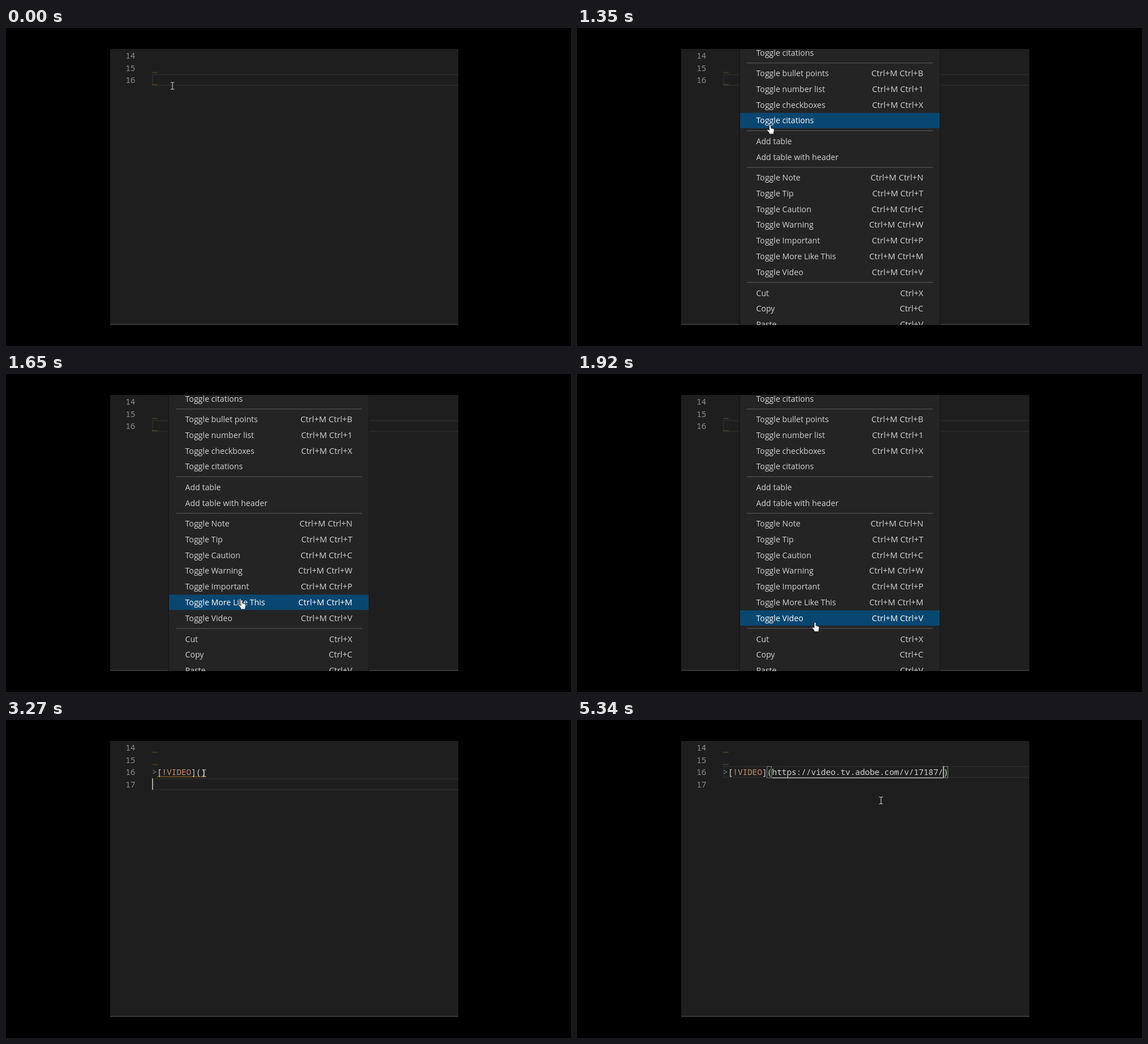
Recreate the animation shown at these times as an HTML page. Size 998 by 561 pixels, loop 5.55 s.

```html
<!DOCTYPE html>
<html lang="en">
<head>
<meta charset="utf-8">
<title>Insert a video link</title>
<style>
  html, body { margin: 0; width: 100%; height: 100%; overflow: hidden; background: #000; }
  svg { display: block; width: 998px; height: 561px; }
  .code { font: 14.4px "Noto Sans Mono", "DejaVu Sans Mono", monospace; fill: #d4d4d4; }
  .gutter { fill: #8e8e8e; text-anchor: end; }
  .quote { fill: #808080; }
  .tag { fill: #ce9178; }
  .menu { font: 14.15px "Open Sans", "Noto Sans", sans-serif; fill: #d2d2d2; }
  .menu .on text { fill: #fff; }
  .menu .bar { fill: none; }
  .menu .on .bar { fill: #094771; }
  .menu .keys { font-size: 14.7px; text-anchor: end; }
  .wave { fill: none; stroke: #a9701f; stroke-width: 1; }
  .faint { opacity: .6; }
  .box { fill: #1b241b; stroke: #858585; }
</style>
</head>
<body>
<svg viewBox="0 0 998 561">
  <clipPath id="pane"><rect x="184" y="37" width="615" height="487"/></clipPath>
  <g clip-path="url(#pane)">
    <rect x="184" y="37" width="615" height="487" fill="#1e1e1e"/>
    <rect id="line" x="259" width="560" height="19" fill="none" stroke="#2a2a2a" stroke-width="2"/>
    <g id="code" class="code"></g>
    <rect x="184" y="522" width="615" height="1.5" fill="#3f3f3f"/>
    <g id="menu" class="menu">
      <rect x="286" y="30" width="356" height="500" fill="#181818"/>
      <rect x="288" y="30" width="352.5" height="500" fill="#242425"/>
    </g>
  </g>
  <g id="beam" fill="none" stroke="#d0d0d0" stroke-width="1.1">
    <path d="M-3.5-6H-1L0-5L1-6H3.5M0-5V5M-3.5 6H-1L0 5L1 6H3.5"/>
  </g>
  <path id="hand" fill="#fff" stroke="#111" stroke-width=".8"
    d="M-1.5 1Q-1.5-.5 0-.5T1.5 1V5.5L5.5 6.5Q7.5 7 7.5 9L6.5 13V16H-1.5V14L-5 9.5Q-5 7.5-3.5 8L-1.5 9.5Z"/>
</svg>
<script>
const LOOP = 5550, STEP = 30;
const CHAR = 8.65, LEFT = 258, PITCH = 21.5;
const OPEN = 390, INSERT = 2160, CLICK = 3480, PASTE = 4140, LINKED = 4320;
const URL_TEXT = "https://video.tv.adobe.com/v/17187/";

const $ = id => document.getElementById(id);
const col = n => LEFT + n * CHAR;
const rowTop = n => 81.5 + (n - 16) * PITCH;

function add(parent, tag, attrs, text = "") {
  const el = document.createElementNS("http://www.w3.org/2000/svg", tag);
  for (const key in attrs) el.setAttribute(key, attrs[key]);
  el.textContent = text;
  return parent.appendChild(el);
}
const show = (el, on) => el.setAttribute("visibility", on ? "visible" : "hidden");
const within = (t, a, b) => t >= a && t < b;

// Editor
const code = $("code");
const write = (n, row, text, cls = "") =>
  add(code, "text", { x: col(n), y: rowTop(row) + 15.5, class: cls }, text);

function wave(from, to, row, cls = "") {
  let d = `M${from} ${rowTop(row) + 19.5}`;
  for (let x = from, up = true; x < to; x += 2, up = !up) d += `l2 ${up ? -2 : 2}`;
  return add(code, "path", { d, class: "wave " + cls });
}
const box = n => add(code, "rect",
  { x: col(n) - .3, y: 82, width: 8, height: 20, class: "box" });

const numbers = [14, 15, 16, 17].map(n =>
  add(code, "text", { x: 228.5, y: rowTop(n) + 15.5, class: "gutter" }, n));
const waves = [14, 15, 16].map(n => wave(LEFT, 267, n, "faint"));
const openBox = box(9), innerBox = box(10), outerBox = box(10 + URL_TEXT.length);
const snippet = [write(0, 16, ">", "quote"), write(1, 16, "["),
  write(2, 16, "!VIDEO", "tag"), write(8, 16, "]"), write(9, 16, "(")];
const innerClose = write(10, 16, ")");
const link = write(10, 16, URL_TEXT);
const outerClose = write(10 + URL_TEXT.length, 16, ")");
const underline = add(code, "rect",
  { x: col(10), y: 101.5, width: URL_TEXT.length * CHAR, height: 1.2, fill: "#d4d4d4" });
const tagWave = wave(267, 336, 16), parenWave = wave(337, 353, 16);
const bulb = add(code, "path", { fill: "#2c2212", stroke: "#5d431a", "stroke-width": 1.5,
  d: "M264 75V70Q259 66 260 61Q263 56 268 57Q274 59 273 65Q272 68 269 70V75Z" });
const caret = add(code, "rect", { width: 1.6, height: 20, fill: "#c4c4c0" });

// Context menu: centre of the first entry, then label and shortcut of each
const menu = $("menu");
const entries = [];
function group(y, ...items) {
  items.forEach((item, i) => {
    const [label, keys = ""] = item.split("|");
    const mid = y + i * 27.75;
    const el = add(menu, "g", {});
    add(el, "rect", { x: 288, y: mid - 13.7, width: 352.5, height: 27, class: "bar" });
    add(el, "text", { x: 316.5, y: mid + 4.9 }, label);
    add(el, "text", { x: 611.8, y: mid + 4.9, class: "keys" }, keys);
    entries.push({ el, mid });
  });
}
group(43.7, "Toggle citations");
group(80.2, "Toggle bullet points|Ctrl+M Ctrl+B", "Toggle number list|Ctrl+M Ctrl+1",
  "Toggle checkboxes|Ctrl+M Ctrl+X", "Toggle citations");
group(200.2, "Add table", "Add table with header");
group(264.2, "Toggle Note|Ctrl+M Ctrl+N", "Toggle Tip|Ctrl+M Ctrl+T",
  "Toggle Caution|Ctrl+M Ctrl+C", "Toggle Warning|Ctrl+M Ctrl+W",
  "Toggle Important|Ctrl+M Ctrl+P", "Toggle More Like This|Ctrl+M Ctrl+M",
  "Toggle Video|Ctrl+M Ctrl+V");
group(467.7, "Cut|Ctrl+X", "Copy|Ctrl+C", "Paste|Ctrl+V");
for (const y of [61.2, 180.7, 245.2, 448.2])
  add(menu, "rect", { x: 300, y, width: 328.5, height: 1.1, fill: "#585858" });

// Pointer path: time, x, y, easing into the point
const linear = p => p, easeOut = p => 1 - (1 - p) ** 2, smooth = p => p * p * (3 - 2 * p);
const path = [
  [0, 294, 102, linear], [1260, 294, 102, linear], [1350, 341, 171, linear],
  [1530, 409.5, 329.5, linear], [1830, 420, 438, easeOut], [1920, 420.5, 438.5, linear],
  [2430, 420.5, 438.5, linear], [2580, 392, 316, linear], [3000, 402, 112, easeOut],
  [3330, 345, 92, smooth], [3570, 345, 92, linear], [4020, 537, 142, smooth],
  [LOOP, 537, 142, linear]
];
function pointerAt(t) {
  const i = path.findIndex(k => k[0] > t);
  const [t0, x0, y0] = path[i - 1], [t1, x1, y1, ease] = path[i];
  const p = ease((t - t0) / (t1 - t0));
  return [x0 + (x1 - x0) * p, y0 + (y1 - y0) * p];
}

function render(t) {
  const menuOpen = within(t, OPEN, INSERT);
  const inserted = t >= INSERT, clicked = t >= CLICK, pasted = t >= PASTE;
  const linked = t >= LINKED;

  const row = inserted && !clicked ? 17 : 16;
  $("line").setAttribute("y", rowTop(row) + .7);
  const caretCol = pasted ? 10 + URL_TEXT.length : clicked ? 10 : 0;
  caret.setAttribute("x", col(caretCol) - (caretCol ? .6 : 0));
  caret.setAttribute("y", rowTop(row));
  show(caret, within(t, 240, OPEN) || within(t, INSERT, 2490) ||
    within(t, 2970, 4740) || t >= 5220);

  show(numbers[3], inserted);
  show(waves[0], inserted);
  show(waves[2], !inserted);
  snippet.forEach(el => show(el, inserted));
  show(innerClose, inserted && !pasted);
  show(link, pasted);
  show(outerClose, pasted);
  show(underline, linked);
  show(tagWave, inserted && !linked);
  show(parenWave, inserted && !clicked);
  show(openBox, clicked);
  show(innerBox, clicked && !pasted);
  show(outerBox, pasted);
  show(bulb, within(t, CLICK + 60, LINKED));

  const [x, y] = pointerAt(t);
  menu.setAttribute("display", menuOpen ? "inline" : "none");
  for (const { el, mid } of entries)
    el.setAttribute("class", within(y, mid - 13.7, mid + 13.7) ? "on" : "");
  for (const id of ["beam", "hand"]) {
    $(id).setAttribute("transform", `translate(${x} ${y})`);
    show($(id), (id === "hand") === menuOpen);
  }
}

const start = performance.now();
function tick() {
  const t = (performance.now() - start) % LOOP;
  render(Math.floor(t / STEP) * STEP);
  requestAnimationFrame(tick);
}
tick();
</script>
</body>
</html>
```
